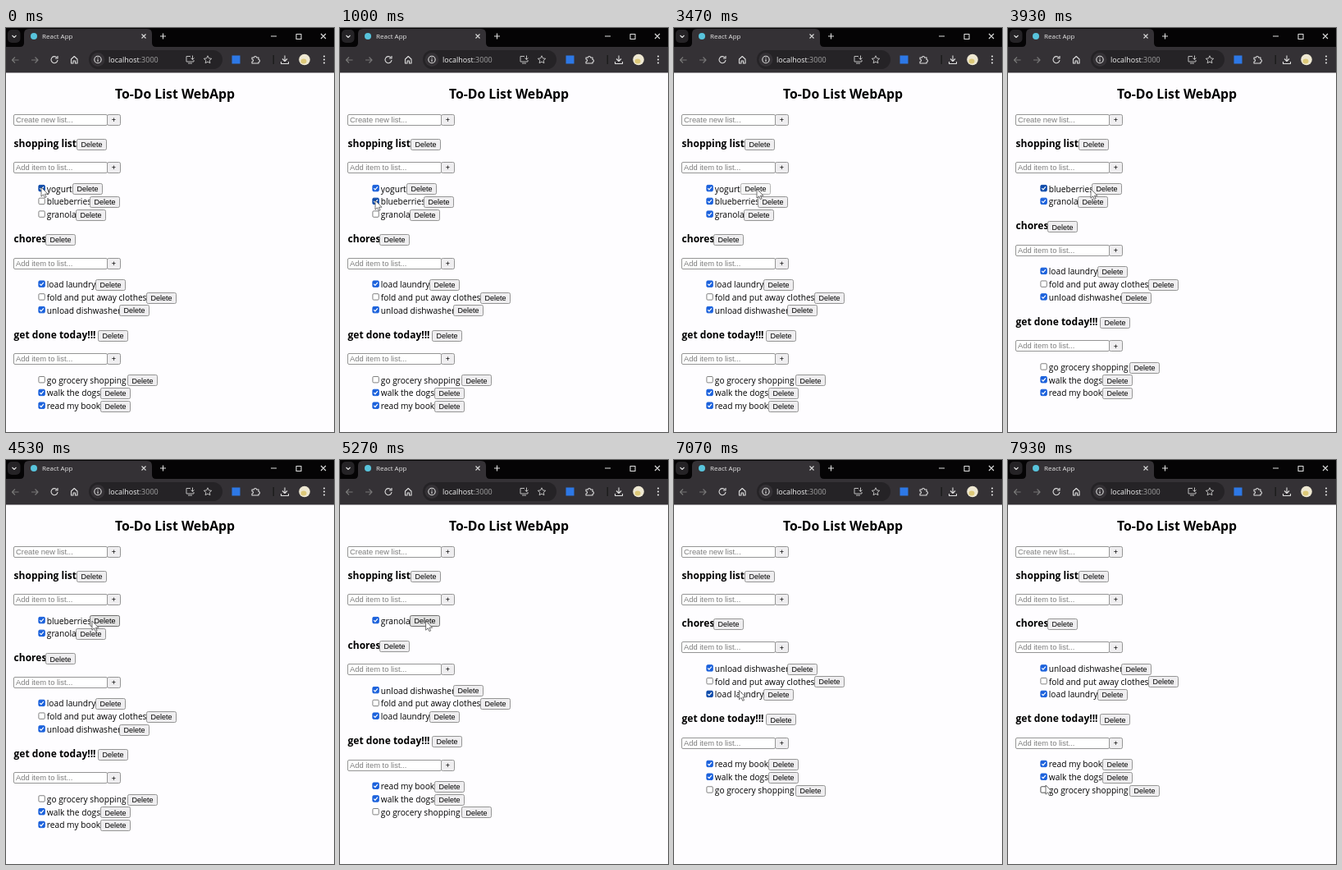
Write an HTML page that moves like this. It is 400 px wide and 492 px high and loops after 8 s.

```html
<!DOCTYPE html>
<html lang="en">
<head>
<meta charset="utf-8">
<title>To-Do List WebApp</title>
<style>
html, body { margin: 0; width: 100%; height: 100%; overflow: hidden; background: #fefdff; }
svg { display: block; }
text { font: 10.2px "Open Sans", "Noto Sans", sans-serif; fill: #000; }
.title { font-size: 15.8px; font-weight: 700; text-anchor: middle; }
.heading { font-size: 12px; font-weight: 700; }
.control { font: 9px "Liberation Sans", Arial, sans-serif; text-anchor: middle; }
.hint { font: 9.4px "Liberation Sans", Arial, sans-serif; fill: #7c7c7c; }
.tab { font-size: 8px; fill: #e8e8e8; }
.url { font-size: 9px; fill: #f2f2f2; }
.field { fill: #fff; stroke: #959595; }
.button { fill: #efeef0; stroke: #959595; }
.button.hover { fill: #e2e2e2; stroke: #707070; }
.button.press { fill: #f6f6f6; stroke: #b4b4b4; }
.box { fill: #fff; stroke: #808080; }
.box.hover { stroke: #4f4f4f; }
.box.on { fill: #1c62dc; stroke: #1c62dc; }
.box.on.hover { fill: #0f4cab; stroke: #0f4cab; }
.tick { fill: none; stroke: #fff; stroke-width: 1.2; }
.icon { fill: none; stroke: #dedede; stroke-width: 1.1; stroke-linejoin: round; }
.soft { stroke: #bdbdbd; stroke-width: 1; }
.dim { stroke: #777; }
</style>
</head>
<body>
<svg width="400" height="492" viewBox="0 0 400 492">
  <!-- browser window -->
  <rect width="400" height="23" fill="#050405"/>
  <rect y="23" width="400" height="31.500" fill="#343135"/>
  <path d="M17 23q5 0 5-5V7q0-6 6-6H172q6 0 6 6V18q0 5 5 5Z" fill="#343135"/>
  <rect x="2" y="2" width="15.500" height="16" rx="5" fill="#252326"/>
  <circle cx="34" cy="10" r="4" fill="#58c4dc"/>
  <text class="tab" x="44" y="13">React App</text>
  <rect x="101" y="27" width="163" height="23" rx="11.500" fill="#252326"/>
  <circle cx="112" cy="38.500" r="8.500" fill="#343135"/>
  <text class="url" x="125" y="42">localhost<tspan fill="#a5a5a5">:3000</tspan></text>
  <g class="icon">
    <path d="M7.500 9l2.500 2.500L12.500 9"/>
    <path d="M165.500 7.500l5 5m0-5l-5 5M188 10h7m-3.500-3.500v7"/>
    <path d="M323 10h7M354 7.500h6v6h-6zM384 7l6 6m0-6l-6 6"/>
    <path class="dim" d="M15.500 39H7.500m3.500-3.500L7.500 39l3.500 3.500M31 39h8m-3.500-3.500L39 39l-3.500 3.500"/>
    <path d="M62 36a4 4 0 1 0 1 3M63 34v3h-3"/>
    <path d="M79.500 38v5h2.500v-3h2.500v3H87v-5l-3.750-3.500z"/>
    <circle cx="112" cy="38.500" r="4.200"/>
    <path d="M112 38v3m0-5v1"/>
    <path class="soft" d="M225 34.500h-5v6.500h9V39M222 43h5M227.500 33.500v5m-2-2l2 2 2-2"/>
    <path class="soft" d="M246 33.800l1.400 3.100 3.300.4-2.500 2.200.7 3.300-2.900-1.700-2.900 1.700.7-3.300-2.500-2.200 3.300-.4z"/>
    <path d="M300 36h2.500a1.500 1.500 0 0 1 3 0h2.500v2.500a1.500 1.500 0 0 1 0 3V43h-8v-2a1.500 1.500 0 0 0 0-3z"/>
    <path d="M340 33.500v7m-3-3l3 3 3-3M335.500 41v2.500h9V41"/>
  </g>
  <rect x="275.500" y="33.500" width="10" height="10" fill="#2d78e6"/>
  <rect x="325.500" y="33" width="1.500" height="11" fill="#1c1c1c"/>
  <circle cx="364" cy="38.500" r="6.800" fill="#eee8d2"/>
  <ellipse cx="363" cy="40.500" rx="3.500" ry="3" fill="#dcc878"/>
  <g fill="#dedede">
    <circle cx="388" cy="34.500" r="1.100"/><circle cx="388" cy="38.500" r="1.100"/><circle cx="388" cy="42.500" r="1.100"/>
  </g>
  <text class="title" x="206" y="85.500">To-Do List WebApp</text>
  <g id="page"></g>
  <path id="cursor" d="M0 0V11.200L2.600 8.800 4.300 12.600 6.100 11.800 4.400 8.200H8Z" fill="#fff" stroke="#4c4c4c" stroke-width=".8"/>
</svg>
<script>
const LOOP = 8000, ROW = 15.75;
const CHECK_BLUEBERRIES = 1000, CHECK_GRANOLA = 2230;
const DELETE_YOGURT = 3600, DELETE_BLUEBERRIES = 4870, DELETE_GRANOLA = 6110;
const PRESS_TIME = 160;

// time, x, y of the pointer tip
const POINTER = [
  [0, 43, 194], [450, 43, 194], [850, 43, 210], [1250, 43, 210], [1700, 43, 225],
  [2450, 43, 225], [3150, 101, 196], [4200, 101, 196], [4550, 105, 196],
  [6200, 104, 196], [6600, 104, 196], [7650, 46, 396], [LOOP, 46, 396]
];

const page = document.getElementById("page");
const cursor = document.getElementById("cursor");
const snap = v => Math.round(v) + .5;

function pointerAt(t) {
  const i = Math.max(1, POINTER.findIndex(p => p[0] > t));
  const [t0, x0, y0] = POINTER[i - 1], [t1, x1, y1] = POINTER[i];
  const u = (t - t0) / (t1 - t0), k = u * u * (3 - 2 * u);
  return { x: x0 + (x1 - x0) * k, y: y0 + (y1 - y0) * k };
}

// item: label, x of its delete button, checked
function listsAt(t) {
  const shopping = [
    ["yogurt", 81, true, DELETE_YOGURT],
    ["blueberries", 102, t >= CHECK_BLUEBERRIES, DELETE_BLUEBERRIES],
    ["granola", 85, t >= CHECK_GRANOLA, DELETE_GRANOLA]
  ].filter(item => t < item[3]);
  const chores = [
    ["load laundry", 109, true], ["fold and put away clothes", 171, false], ["unload dishwasher", 138, true]
  ];
  const today = [
    ["go grocery shopping", 148, false], ["walk the dogs", 115, true], ["read my book", 115, true]
  ];
  if (t >= DELETE_BLUEBERRIES) { chores.reverse(); today.reverse(); }
  return [["shopping list", 86, shopping], ["chores", 48, chores], ["get done today!!!", 112, today]];
}

function render(t) {
  const tip = pointerAt(t);
  const pressed = [DELETE_YOGURT, DELETE_BLUEBERRIES, DELETE_GRANOLA].some(d => t < d && t > d - PRESS_TIME);
  const over = (x0, x1, cy) => tip.x >= x0 && tip.x < x1 && Math.abs(tip.y - cy) < ROW / 2;

  const button = (label, x, cy, width = 36) => {
    const state = over(x, x + width, cy) ? (pressed ? "press" : "hover") : "";
    return `<rect class="button ${state}" x="${x + .5}" y="${snap(cy - 7)}" width="${width}" height="13" rx="1.8"/>
      <text class="control" x="${x + width / 2 + .5}" y="${cy + 3.2}">${label}</text>`;
  };
  const field = (hint, cy) =>
    `<rect class="field" x="9.500" y="${snap(cy - 7)}" width="114" height="13" rx="1.5"/>
     <text class="hint" x="12" y="${cy + 3}">${hint}</text>` + button("+", 123, cy, 16);
  const checkbox = (on, hover, cy) =>
    `<rect class="box ${on ? "on" : ""} ${hover ? "hover" : ""}" x="39.900" y="${cy - 4.8}" width="7.400" height="7.400" rx="1.2"/>` +
    (on ? `<path class="tick" d="M41.300 ${cy - 1}l1.600 1.700 3-3.600"/>` : "");

  let html = field("Create new list...", 111.5), y = 141.5;
  for (const [name, buttonX, items] of listsAt(t)) {
    html += `<text class="heading" x="9.600" y="${y + 3}">${name}</text>`;
    html += button("Delete", buttonX, y) + field("Add item to list...", y + 28.5);
    items.forEach(([label, x, on], i) => {
      const cy = y + 54.7 + i * ROW;
      html += checkbox(on, over(39, x, cy), cy);
      html += `<text x="49.800" y="${cy + 3.3}">${label}</text>` + button("Delete", x, cy);
    });
    y += items.length ? 69.3 + items.length * ROW : 58.3;
  }
  page.innerHTML = html;
  cursor.setAttribute("transform", `translate(${tip.x} ${tip.y})`);
}

const start = performance.now();
function tick() {
  render((performance.now() - start) % LOOP);
  requestAnimationFrame(tick);
}
tick();
</script>
</body>
</html>
```
